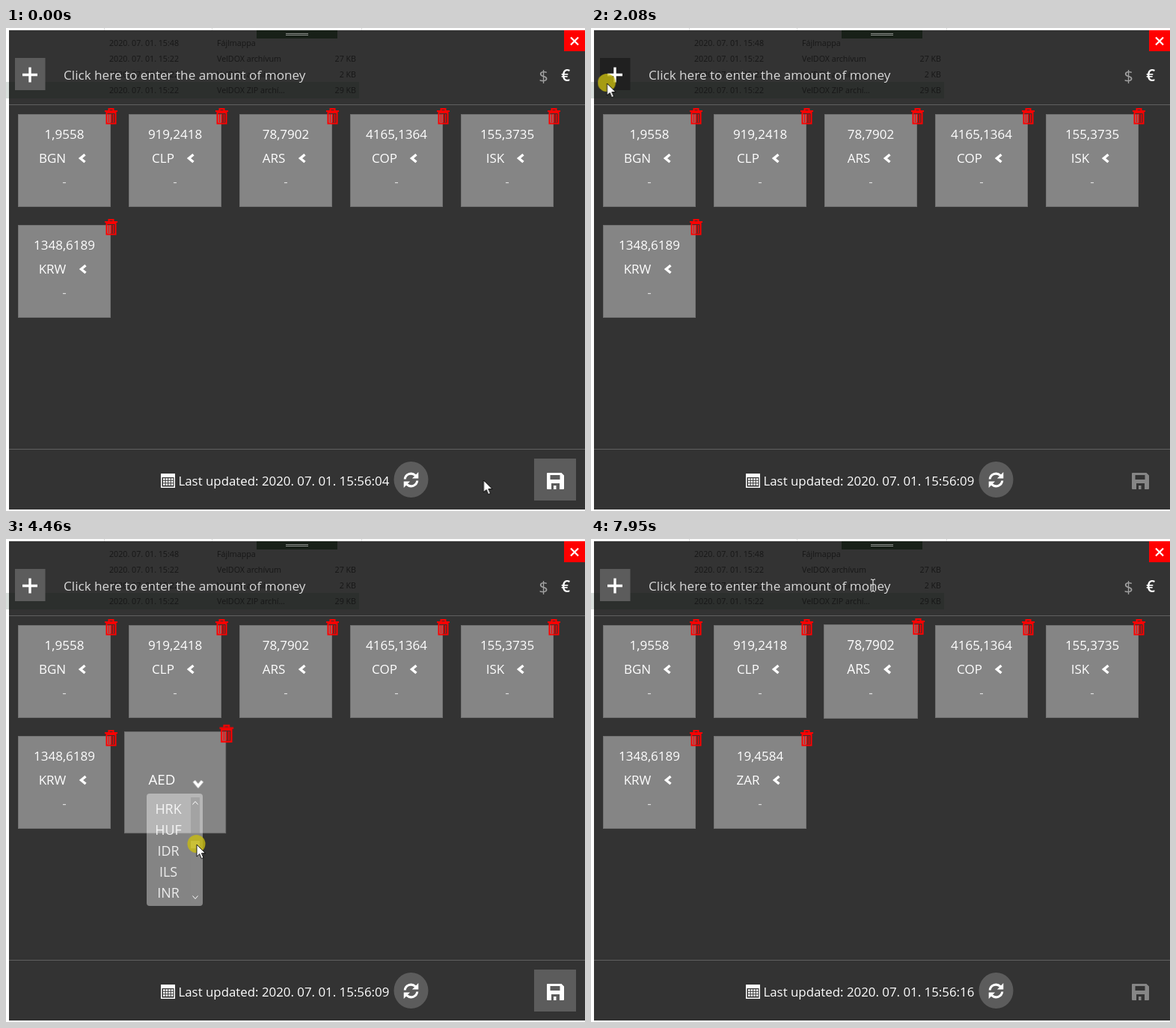
Write an HTML page that moves like this. It is 774 px wide and 645 px high and loops after 8000 ms.

```html
<!DOCTYPE html>
<html lang="en">
<head>
<meta charset="utf-8">
<title>Currency converter</title>
<style>
html, body { margin: 0; width: 100%; height: 100%; overflow: hidden; background: #fff; }
svg { display: block; width: 774px; height: 645px; font: 17px "Open Sans", "Noto Sans", sans-serif; fill: #fff; }
.mid { text-anchor: middle; }
.line { fill: none; stroke: #fff; }
.files { font-size: 10.7px; fill: #171717; }

/* 80 ms = 1 % */
.step, .move { animation: 8s linear infinite; }
.step { animation-timing-function: step-end; }

#cursor { animation-name: cursor; }
@keyframes cursor {
  0%, .9% { transform: translate(638.5px, 604px); }
  5.5% { transform: translate(428px, 228px); }
  9.5% { transform: translate(530px, 585px); }
  10.6%, 13% { transform: translate(541px, 604px); }
  14.375% { transform: translate(501.5px, 554px); }
  20.6% { transform: translate(74px, 72px); }
  22.25% { transform: translate(42px, 66px); }
  25%, 28.5% { transform: translate(21.5px, 74px); }
  31.75% { transform: translate(70px, 195px); }
  33% { transform: translate(90px, 220px); }
  35.3%, 37% { transform: translate(246px, 322px); }
  39%, 43.3% { transform: translate(239.5px, 413px); }
  46%, 47% { transform: translate(255px, 376px); }
  51.9%, 55.75% { transform: translate(255px, 408px); }
  59.6%, 61.5% { transform: translate(255px, 430px); }
  65%, 66% { transform: translate(255px, 468px); }
  68.5%, 75% { transform: translate(208.5px, 449px); }
  82% { transform: translate(464px, 543px); }
  84.75% { transform: translate(533px, 598px); }
  85.8%, 93% { transform: translate(535.5px, 603px); }
  93.6% { transform: translate(513px, 507px); }
  99.1%, 100% { transform: translate(376px, 62px); }
}
#press { animation-name: press; }
@keyframes press {
  0%, 12.4%, 27.4%, 36.4%, 65.4%, 74%, 87.6% { visibility: hidden; }
  11.4%, 25.5%, 35.5%, 47%, 72.3%, 86.6% { visibility: visible; }
}
#arrow { animation-name: arrow; }
@keyframes arrow { 0% { visibility: visible; } 98.4%, 100% { visibility: hidden; } }
#beam { animation-name: beam; }
@keyframes beam { 0% { visibility: hidden; } 98.4%, 100% { visibility: visible; } }

#plus { animation-name: plus; }
@keyframes plus { 0%, 29.75% { fill: #5c5c5c; } 22.25% { fill: #202020; } }
#disc { animation-name: disc; }
@keyframes disc { 0%, 13.5%, 93.5% { fill: #5c5c5c; } 10%, 84.75% { fill: #202020; } }

/* footer while rates are loading */
#rule { animation-name: rule; }
@keyframes rule { 0%, 20.5%, 91.75% { transform: none; } 11.875%, 87% { transform: translateY(8px); } }
#caption { animation-name: caption; }
@keyframes caption { 0%, 20.5%, 91.75% { transform: none; } 11.875%, 87% { transform: translateY(3px); } }
#sync { animation-name: sync; }
@keyframes sync { 0%, 20.5%, 91.75% { transform: none; } 11.875%, 87% { transform: translateY(4px); } }
#reload { animation-name: reload; }
@keyframes reload { 0%, 20.5%, 91.75% { visibility: visible; } 11.875%, 87% { visibility: hidden; } }
#cancel { animation-name: cancel; }
@keyframes cancel { 0%, 20.5%, 91.75% { visibility: hidden; } 11.875%, 87% { visibility: visible; } }
#save { animation-name: save; }
@keyframes save { 0%, 27.5% { visibility: visible; } 11.875%, 87%, 100% { visibility: hidden; } }
#saved { animation-name: saved; }
@keyframes saved { 0%, 27.5% { visibility: hidden; } 20.5%, 91.75%, 100% { visibility: visible; } }
#time1 { animation-name: time1; }
@keyframes time1 { 0% { visibility: visible; } 20.5%, 100% { visibility: hidden; } }
#time2 { animation-name: time2; }
@keyframes time2 { 0%, 91.75%, 100% { visibility: hidden; } 20.5% { visibility: visible; } }
#time3, #ZAR .rate { animation-name: time3; }
@keyframes time3 { 0% { visibility: hidden; } 91.75%, 100% { visibility: visible; } }

/* tiles */
.tile { transform-origin: 62px 62px; }
#ARS { animation-name: hover; }
@keyframes hover {
  0%, 4.5%, 7.2%, 96%, 100% { transform: scale(1); }
  5.75% { transform: scale(1.06); }
  97.2% { transform: scale(1.07); }
  99.375% { transform: scale(1.016); }
}
#ZAR { animation-name: fresh; }
@keyframes fresh {
  0%, 27.5% { transform: scale(0); }
  30%, 33.5% { transform: scale(1); }
  35%, 75.4% { transform: scale(1.1); }
  77.5%, 100% { transform: scale(1); }
}
#ZAR .chevron { transform-origin: 89.5px 58.5px; animation-name: turn; }
@keyframes turn {
  0%, 36% { transform: rotate(0deg); }
  39%, 74.4% { transform: rotate(-90deg); }
  85.9% { transform: rotate(45deg); }
  89%, 100% { transform: rotate(0deg); }
}
#ZAR .code { animation-name: chosen; }
@keyframes chosen { 0% { visibility: hidden; } 74.1%, 100% { visibility: visible; } }
#initial { animation-name: initial-code; }
@keyframes initial-code { 0% { visibility: visible; } 74.1%, 100% { visibility: hidden; } }

/* drop-down */
#menu { transform-origin: 225px 340px; animation-name: menu; }
@keyframes menu {
  0%, 36.2% { transform: scaleY(0); }
  38%, 73.6% { transform: scaleY(1); }
  74.4%, 100% { transform: scaleY(0); }
}
#list { animation-name: list; }
@keyframes list {
  0% { transform: none; animation-timing-function: step-end; }
  38.4% { transform: translateY(-84px); animation-timing-function: step-end; }
  39.4% { transform: translateY(-168px); }
  47% { transform: translateY(-168px); animation-timing-function: steps(14); }
  51.9% { transform: translateY(-560px); }
  55.75% { transform: translateY(-560px); animation-timing-function: steps(10); }
  59.6% { transform: translateY(-840px); }
  61.5% { transform: translateY(-840px); animation-timing-function: steps(17); }
  65%, 100% { transform: translateY(-1316px); }
}
#thumb { animation-name: thumb; }
@keyframes thumb {
  0%, 38.3% { transform: none; }
  39.4%, 47% { transform: translateY(13px); }
  51.9%, 55.75% { transform: translateY(45px); }
  59.6%, 61.5% { transform: translateY(67px); }
  65%, 100% { transform: translateY(105px); }
}
#thin { animation-name: thin; }
@keyframes thin { 0% { visibility: visible; } 45%, 100% { visibility: hidden; } }
.wide { animation-name: wide; }
@keyframes wide { 0% { visibility: hidden; } 45%, 100% { visibility: visible; } }
#pick { animation-name: pick; }
@keyframes pick { 0% { visibility: hidden; } 68.1%, 100% { visibility: visible; } }
</style>
</head>
<body>
<svg viewBox="0 0 774 645">
  <defs>
    <g id="trash" fill="none" stroke="#f00">
      <path d="M0 4H17" stroke-width="2"/>
      <path d="M5.5 3V1H11.5V3" stroke-width="2"/>
      <path d="M2.500 6V20.500H14.500V6Z" stroke-width="2"/>
      <path d="M5.500 8V19M8.500 8V19M11.500 8V19" stroke-width="1.600"/>
    </g>
    <path id="floppy" fill-rule="evenodd" d="M1 0H19.500L23 3.500V21Q23 22 22 22H1Q0 22 0 21V1Q0 0 1 0ZM4.500 3V9H17.500V3ZM6 14V22H9V17H12.500V22H17V14Z"/>
    <path id="half" d="M-9.800 -1A9.800 9.800 0 0 1 6.600 -7.200L9.800 -10.400V-2H1.400L4.500 -5A6.800 6.800 0 0 0 -6.800 -1Z"/>
    <clipPath id="rows"><rect x="188" y="345" width="75" height="141"/></clipPath>
  </defs>

  <path d="M131.500 0V3M275.500 0V3M475.500 0V3" stroke="#ddd"/>
  <rect y="72" width="4" height="22" fill="#d9dfdc"/>
  <rect x="4" y="3" width="770" height="640" fill="#333"/>
  <rect x="4" y="72" width="468" height="22" fill="#2c2f2d"/>
  <g class="files" id="files"></g>
  <rect x="335" y="3" width="108" height="11" fill="#182018"/>
  <path d="M374 7.500H404M374 9.500H404" stroke="#8b8f8b"/>

  <rect x="746" y="3" width="28" height="28" fill="#f00"/>
  <path class="line" d="M755 12.500L765 22.500M765 12.500L755 22.500" stroke-width="2.200"/>
  <rect id="plus" class="step" x="12" y="40" width="40.500" height="43"/>
  <path class="line" d="M22 62.500H42M32 52.500V72.500" stroke-width="3.400"/>
  <text x="77" y="69" font-size="17.150" fill="#d8d8d8">Click here to enter the amount of money</text>
  <text class="mid" x="718.500" y="71.500" font-size="22" fill="#a0a0a0">$</text>
  <text class="mid" x="748" y="71" font-size="21" font-weight="600">€</text>
  <path d="M4 102.500H774" stroke="#606060"/>

  <g id="tiles"></g>

  <path id="rule" class="step" d="M4 562.500H774" stroke="#606060"/>
  <g id="caption" class="step">
    <path fill-rule="evenodd" d="M207 595H226V614H207ZM208.500 600V612.500H224.500V600Z"/>
    <path class="line" d="M210 602.500H223.500M210 606H223.500M210 609.500H223.500" stroke-width="2.500" stroke-dasharray="2.600 1"/>
    <g font-size="16.850" id="times"></g>
  </g>
  <g id="sync" class="step">
    <ellipse id="disc" class="step" cx="541.500" cy="603" rx="23" ry="24"/>
    <g transform="translate(541.500 603.500)">
      <g id="reload" class="step"><use href="#half"/><use href="#half" transform="rotate(180)"/></g>
      <path id="cancel" class="step line" d="M-5 -5L5 5M5 -5L-5 5" stroke-width="2.800"/>
    </g>
  </g>
  <g id="save" class="step">
    <rect x="706" y="575" width="56" height="56" fill="#5c5c5c"/>
    <use href="#floppy" x="723" y="594"/>
  </g>
  <g id="saved" class="step" fill="#868686"><use href="#floppy" x="723" y="594"/></g>

  <g id="menu" class="move">
    <rect x="188" y="340" width="75" height="150" rx="4" fill-opacity=".4"/>
    <rect id="pick" class="step" x="192" y="430.500" width="50" height="27.500" rx="3" fill="#1b1b1b"/>
    <g clip-path="url(#rows)"><g id="list" class="move mid" font-size="17.900" fill-opacity=".86"></g></g>
    <g class="step wide">
      <rect x="247" y="345" width="12" height="142" fill="#888" fill-opacity=".4"/>
      <path class="line" d="M249.500 354.500L253 350.500L256.500 354.500M249.500 476.500L253 480.500L256.500 476.500" stroke="#ddd"/>
    </g>
    <g id="thumb" class="move" fill="#d2d2d2">
      <rect id="thin" class="step" x="255" y="358" width="4" height="10"/>
      <rect class="step wide" x="247" y="358" width="12" height="10"/>
    </g>
  </g>

  <g id="cursor" class="move">
    <circle id="press" class="step" cx="-.5" cy="-1" r="12" fill="#c8bc10" fill-opacity=".8"/>
    <path id="arrow" class="step" d="M0 0V16L3.700 12.500L6.300 18.700L9 17.500L6.400 11.600H11.500Z" stroke="#000" stroke-width=".9"/>
    <path id="beam" class="step line" d="M-2 -8H0L1 -7L2 -8H4M1 -7V7M-2 8H0L1 7L2 8H4" stroke="#ccc"/>
  </g>
</svg>
<script>
const fill = (id, items, draw) => {
  document.getElementById(id).innerHTML = items.map(draw).join('');
};

fill('files', [
  ['15:48', 'Fájlmappa', ''],
  ['15:22', 'VelDOX archívum', '27 KB'],
  ['15:22', 'VelDOX archívum', '2 KB'],
  ['15:22', 'VelDOX ZIP archí...', '29 KB']
], ([time, kind, size], i) => {
  const y = 24 + 21 * i;
  return `<text x="138" y="${y}">2020. 07. 01. ${time}</text>
    <text x="282" y="${y}">${kind}</text>
    <text x="468" y="${y}" text-anchor="end">${size}</text>`;
});

// code, rate, chevron offset from the tile's centre
fill('tiles', [
  ['BGN', '1,9558', 23], ['CLP', '919,2418', 20], ['ARS', '78,7902', 21],
  ['COP', '4165,1364', 22], ['ISK', '155,3735', 17],
  ['KRW', '1348,6189', 24], ['ZAR', '19,4584', 21]
], ([code, rate, offset], i) => `
  <g transform="translate(${16 + 148 * (i % 5)} ${115 + 148 * Math.floor(i / 5)})">
    <g id="${code}" class="tile move">
      <rect x=".5" y=".5" width="123" height="123" fill="#858585" stroke="#737373"/>
      <g class="mid">
        <g class="rate step"><text x="62" y="33">${rate}</text><text x="62" y="96" fill="#ddd">-</text></g>
        <text class="code step" x="46" y="65">${code}</text>
        ${code === 'ZAR' ? '<text id="initial" class="step" x="46" y="65">AED</text>' : ''}
      </g>
      <path class="chevron move line" d="M${66.5 + offset} 54L${60.5 + offset} 59L${66.5 + offset} 64" stroke-width="3.500"/>
      <use href="#trash" x="116" y="-8"/>
    </g>
  </g>`);

fill('times', ['04', '09', '16'], (sec, i) =>
  `<text id="time${i + 1}" class="step" x="230.500" y="611">Last updated: 2020. 07. 01. 15:56:${sec}</text>`);

const codes = `AED ARS AUD BGN BRL BSD CAD CHF CLP CNY COP CZK DKK DOP EGP EUR FJD
  GBP GTQ HKD HRK HUF IDR ILS INR ISK JPY KRW KZT MXN MYR NOK NZD PAB PEN PHP PKR
  PLN PYG RON RUB SAR SEK SGD THB TRY TWD UAH USD UYU ZAR`.split(/\s+/);
fill('list', codes, (code, i) => `<text x="217" y="${367 + 28 * i}">${code}</text>`);
</script>
</body>
</html>
```
